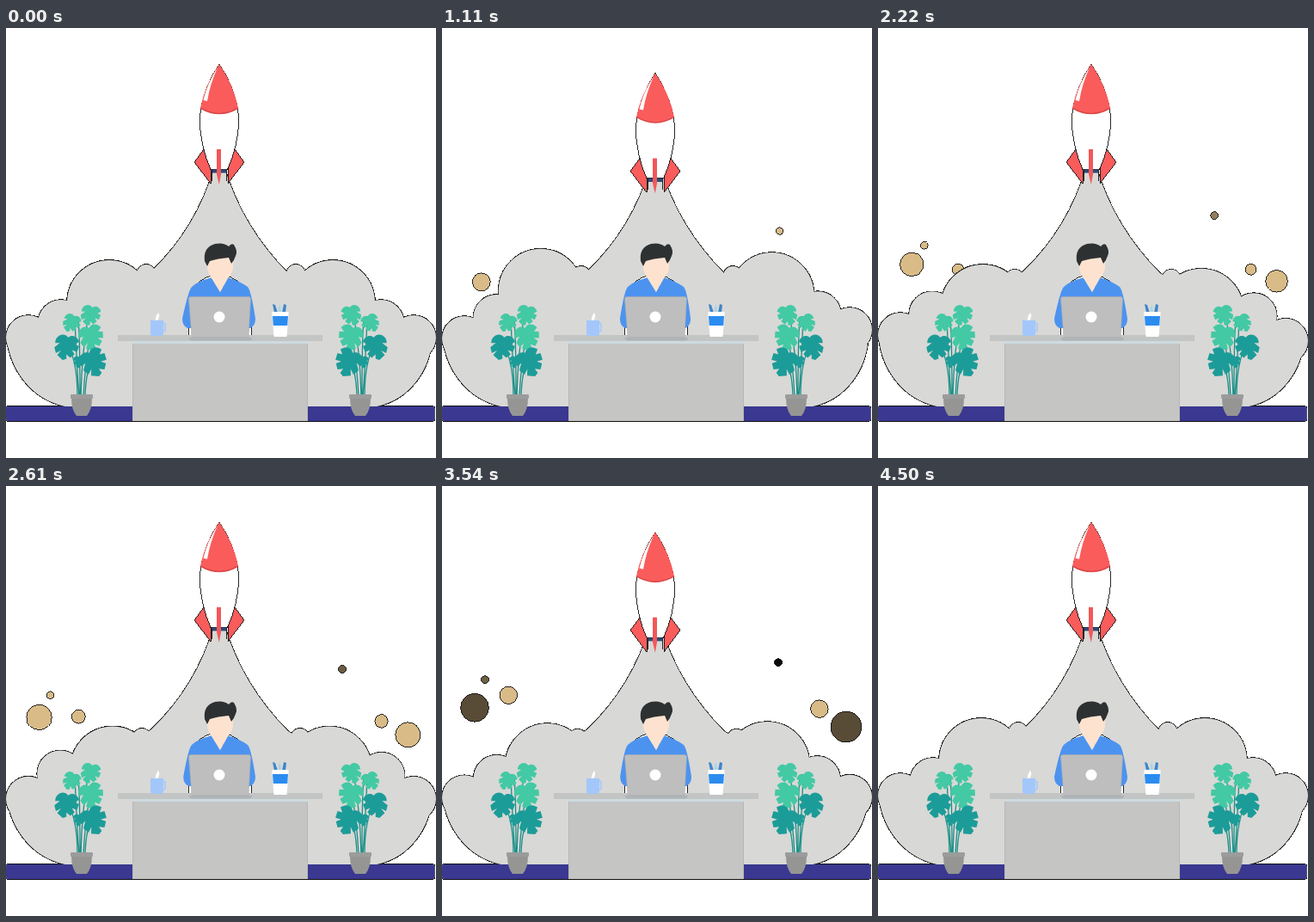
An HTML page for the animation above (4530 ms loop, 500 by 500 pixels).

```html
<!DOCTYPE html>
<html lang="en">
<head>
<meta charset="utf-8">
<title>Rocket launch behind a desk</title>
<style>
html, body { margin: 0; height: 100%; overflow: hidden; background: #fff; }
svg { display: block; width: 100vw; height: 100vh; }
.edge { stroke: #111; stroke-width: .9; shape-rendering: crispEdges; }
</style>
</head>
<body>
<svg viewBox="0 0 500 500">
  <defs>
    <g id="smoke">
      <path d="M2 368C8 404 36 437 76 441H424C464 437 490 404 495 368L460 355 400 330 328 285Q275 232 254 162H242Q222 232 169 283L100 330 40 355Z"/>
      <rect x="0" y="440" width="498.500" height="17" rx="3"/>
    </g>
    <path id="leaf" d="M0-11C-7-17-15-9-13-2L-8-3-13 3-10 9-5 5-8 11-1 15 3 13 2 8 7 11 11 6 7 2 13 3 14-4 9-5 13-9C9-15 3-15 0-11Z"/>
    <g id="plant">
      <path fill="none" stroke="#1b8f86" stroke-width="1.300" d="M85 428Q82 390 80 338M87 428Q88 380 96 332M90 428Q92 390 98 358M83 428Q83 385 70 366M92 428Q93 395 102 386M86 428Q86 360 84 338Q82 333 78 338"/>
      <g fill="#43c9a4">
        <use href="#leaf" transform="translate(98 334) rotate(15) scale(.84)"/>
        <use href="#leaf" transform="translate(76 343) rotate(25) scale(.75)"/>
        <use href="#leaf" transform="translate(99 360) rotate(-12) scale(1.05)"/>
      </g>
      <g fill="#1c9c98">
        <use href="#leaf" transform="translate(70 371) rotate(12) scale(1.03)"/>
        <use href="#leaf" transform="translate(102 389) rotate(-25) scale(1.14)"/>
        <use href="#leaf" transform="translate(85 388) scale(.5)"/>
      </g>
      <path fill="#959694" d="M76 430H100Q100 444 94 451H82Q76 444 76 430Z"/>
      <rect x="75" y="426" width="26" height="5" rx="1" fill="#9b9c9b"/>
    </g>
  </defs>

  <g id="dust" class="edge"></g>
  <use href="#smoke" class="edge" style="stroke-width: 1.6"/>
  <use href="#smoke" fill="#d8d8d6"/>

  <g id="rocket">
    <path class="edge" fill="#fa5c5c" d="M230 141L219 156 238 181V160ZM266 141L277 156 258 181V160Z"/>
    <path class="edge" d="M239.500 164V178M256.500 164V178"/>
    <path class="edge" fill="#fff" d="M248 42Q229 69 225 105Q226 138 238 164.500H257.500Q270 138 271 105Q267 69 248 42Z"/>
    <path fill="#fa5c5c" d="M248 42Q231 67 226 93Q248 106 270 93Q265 67 248 42Z"/>
    <path fill="none" stroke="#dc4747" stroke-width="1.500" d="M226 93Q248 106 270 93"/>
    <path fill="#fff" d="M246 46Q234 64 229.500 84L234 85Q237 66 246 46Z"/>
    <rect x="240" y="164.500" width="16" height="4" fill="#2e4a78"/>
    <path fill="#f2585a" d="M245 141H250V170L247.800 182 245 170Z"/>
  </g>

  <rect x="0" y="440" width="498.500" height="17" rx="3" fill="#3a3890"/>

  <path class="edge" fill="#fff" d="M219 300Q247 273 276 300Z"/>
  <path class="edge" fill="#fff" d="M212 346H285V357H212Z"/>
  <path id="shirt" fill="#4c93f0"/>
  <path fill="#fde3cf" d="M233 267H264V280Q262 287 258 291L249 307 239 291Q233 284 233 267Z"/>
  <path fill="#2e3132" d="M231 271Q229 255 243 251Q253 249 259 254Q262 250 265 252Q270 260 267 265Q265 271 262 274L259 267Q246 268 237 271L234 277Z"/>

  <rect x="147" y="364" width="204" height="93" fill="#c5c5c4"/>
  <path fill="none" stroke="#b5b8b8" d="M147.500 457V366M350.500 457V366"/>
  <rect x="147" y="364" width="204" height="3" fill="#cddbe0"/>
  <rect x="130" y="357" width="238" height="7" fill="#c3c4c4"/>

  <path fill="#bebebe" stroke="#aaa" stroke-width=".6" d="M215 312.500H282Q284.500 312.500 284.500 315L282 359.500H216L212.500 315Q212.500 312.500 215 312.500Z"/>
  <circle cx="248" cy="336" r="6.500" fill="#fff"/>
  <path fill="#aeb4b8" d="M212 360H287L284 363.500H215Z"/>

  <rect x="180" y="343" width="5" height="10" rx="2.500" fill="none" stroke="#a3c7fb" stroke-width="1.500"/>
  <path fill="#a3c7fb" d="M168 340H183V355Q183 358 180 358H171Q168 358 168 355Z"/>
  <path fill="#fff" d="M177 331Q180 335 176 340H174Q173 337 177 331Z"/>

  <path fill="#3f86c9" d="M310 321L313 322 316 331H312ZM323 321L326 322 325 331H321Z"/>
  <path fill="#a8d4ea" d="M317 325L319 321 320 331H317Z"/>
  <path fill="#fff" d="M309.500 330H328.500V334L326.500 359H311.500L309.500 334Z"/>
  <path fill="#2b8cf0" d="M310 335H328L327.200 346H310.800Z"/>

  <use href="#plant"/>
  <use href="#plant" transform="translate(500 0) scale(-1 1)"/>
</svg>
<script>
const LOOP = 4530;

// Mirrored pairs of bumps; left and right give [time, sink] key points.
const bumps = [
  { x: 120, top: 270, r: 49, drift: .4, left: [[900, -14], [2800, 10]], right: [[900, -10], [2300, 10]] },
  { x: 64, top: 316, r: 27, drift: .1, left: [[1950, -10]], right: [[1200, -10]] },
  { x: 26, top: 334, r: 26, drift: 0, left: [[900, 3], [1740, -10], [2700, 4]], right: [[1100, -9], [2300, 4]] },
  { x: 163, top: 275, r: 11, drift: -.7, left: [[3400, 8]], right: [[3400, 8]] }
];

// Each puff goes from one [x, y, radius] to another and darkens at the end.
const puffs = [
  { start: 700, end: 4150, fade: 1500, from: [51, 304, 9], to: [38, 254, 17] },
  { start: 1200, end: 4100, fade: 1100, from: [72, 283, 4], to: [50, 220, 4.5] },
  { start: 1700, end: 4400, fade: 800, from: [115, 300, 5], to: [77, 231, 11.3] },
  { start: 500, end: 3640, fade: 2100, from: [395, 248, 4], to: [391, 205, 4.5] },
  { start: 1250, end: 4400, fade: 800, from: [415, 302, 2.5], to: [439, 252, 11.5] },
  { start: 1250, end: 4150, fade: 1500, from: [437, 309, 7.5], to: [470, 277, 19] }
];

const mix = (a, b, u) => a + (b - a) * u;
const easeInOut = u => (1 - Math.cos(Math.PI * u)) / 2;
const easeOut = (u, power) => 1 - (1 - u) ** power;
const byId = id => document.getElementById(id);
const set = (el, attrs) => { for (const k in attrs) el.setAttribute(k, attrs[k]); };
const addCircle = parent => parent.appendChild(
  document.createElementNS(parent.namespaceURI, "circle"));

// Eases through the key points, from rest and back to rest.
function sway(keys, t) {
  const path = [[0, 0], ...keys, [LOOP, 0]];
  const i = path.findIndex(([time]) => time > t);
  const [t0, v0] = path[i - 1], [t1, v1] = path[i];
  return mix(v0, v1, easeInOut((t - t0) / (t1 - t0)));
}

for (const b of bumps) b.els = [addCircle(byId("smoke")), addCircle(byId("smoke"))];
for (const p of puffs) p.el = addCircle(byId("dust"));

function drawBump({ x, top, r, drift, left, right, els }, t) {
  [left, right].forEach((keys, side) => {
    const sink = sway(keys, t), cx = x + drift * sink;
    set(els[side], { cx: side ? 500 - cx : cx, cy: top + r + sink, r });
  });
}

function drawPuff({ start, end, fade, from, to, el }, t) {
  const visible = t >= start && t < end;
  set(el, { visibility: visible ? "visible" : "hidden" });
  if (!visible) return;
  const u = (t - start) / (end - start);
  const [cx, cy, r] = [4, 1.5, 1.5].map((power, k) => mix(from[k], to[k], easeOut(u, power)));
  const shade = Math.min(1, (t - start) / 400, (end - t) / fade);
  set(el, { cx, cy, r, fill: `rgb(${[217, 187, 135].map(c => Math.round(c * shade))})` });
}

function draw(now) {
  const t = now % LOOP;
  for (const b of bumps) drawBump(b, t);
  for (const p of puffs) drawPuff(p, t);

  // dip for 1.8 s, then hover for 0.9 s
  const dip = Math.min(t % 2700, 1800) / 1800;
  set(byId("rocket"), { transform: `translate(0 ${12 * easeInOut(2 * dip)})` });

  // the arms move a little while typing
  const l = 205 + sway([[1000, 2], [1800, 0], [2300, 0], [3000, 3]], t);
  const r = 290 - sway([[1000, 1], [1800, 0]], t);
  set(byId("shirt"), { d: `M239 290Q222 295 216 301Q212 305 ${l} 338Q${l} 346 ${l + 6} 349H${r - 6}Q${r} 346 ${r} 338Q285 305 281 301Q273 295 258 290L249 307Z` });

  requestAnimationFrame(draw);
}
requestAnimationFrame(draw);
</script>
</body>
</html>
```
